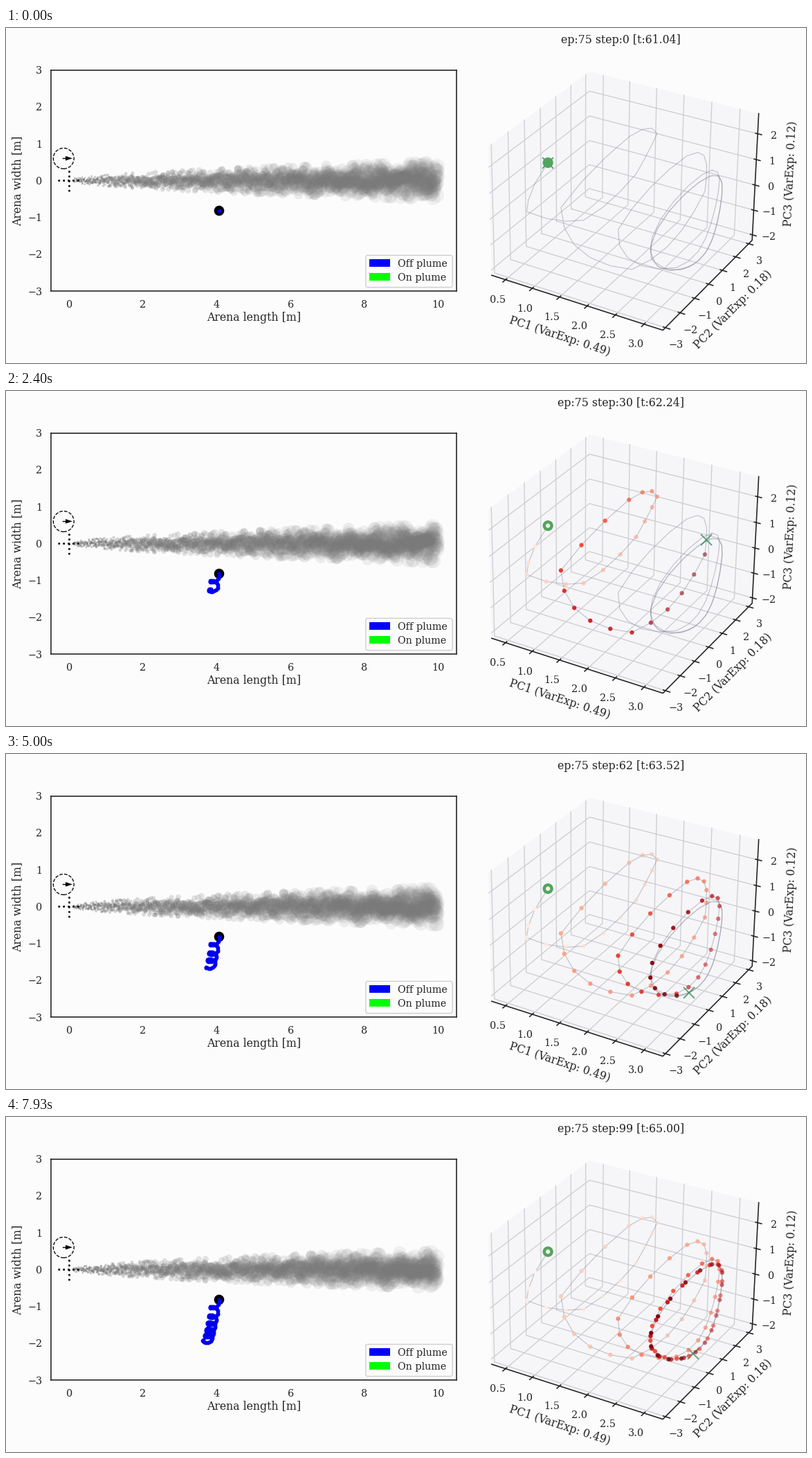
Write a matplotlib script that moves like this. It is 1156 by 484 pixels and loops after 8000 ms.

```python
import numpy as np
import matplotlib.pyplot as plt
from matplotlib.animation import FuncAnimation
from matplotlib.patches import Circle, FancyBboxPatch, Polygon, Rectangle

W, H = 1156, 484
STEPS, INTERVAL = 100, 80
INK, BG = "0.13", "#fcfcfc"
SMALL, LARGE, LINE = 14.4, 15.7, 1.6

plt.rcParams.update({
    "font.family": "DejaVu Serif",
    "text.color": INK,
    "axes.edgecolor": INK,
    "xtick.labelcolor": INK,
    "ytick.labelcolor": INK,
})

# At 72 dpi one point is one pixel.
fig = plt.figure(figsize=(W / 72, H / 72), dpi=72, facecolor=BG)
steps = np.arange(STEPS)


# ---------- arena ----------
arena = fig.add_axes([64.6 / W, 1 - 380.2 / H, 586.5 / W, 319.6 / H], facecolor=BG)
arena.set(xlim=(-0.5, 10.5), ylim=(-3, 3), xticks=range(0, 11, 2), yticks=range(-3, 4))
arena.tick_params(length=0, labelsize=SMALL)
arena.tick_params(axis="x", pad=13)
arena.tick_params(axis="y", pad=12)
for spine in arena.spines.values():
    spine.set_linewidth(LINE)

dotted = dict(color="black", lw=2.6, ls=":", zorder=3)
arena.plot([-0.3, 0.3], [0, 0], **dotted)
arena.plot([0, 0], [-0.3, 0.3], **dotted)

# Wind compass
arena.add_patch(Circle((-0.15, 0.6), 0.28, fill=False, ec="black", lw=1.3, ls="--"))

# Whole-figure layer in pixel units, y pointing down.
px = fig.add_axes([0, 0, 1, 1])
px.set(xlim=(0, W), ylim=(H, 0))
px.axis("off")
px.plot([82, 88], [188.3, 188.3], color="black", lw=1.4)
px.add_patch(Polygon([(86, 185), (96, 188.3), (86, 191.6)], fc="black", lw=0))


def label(x, y, text, size=SMALL, va="center_baseline", ha="center", rot=0):
    return px.text(x, y, text, size=size, va=va, ha=ha, rotation=rot)


label(358.5, 423, "Arena length [m]", LARGE, "baseline")
label(16.5, 220.5, "Arena width [m]", LARGE, "center", rot=90)

# Legend
px.add_patch(FancyBboxPatch((522.5, 331), 120, 41, boxstyle="round,pad=2.6",
                            fc=BG, ec="0.8", lw=1.3))
for y, color, text in ((339.5, "#0000ff", "Off plume"), (360, "#00ff00", "On plume")):
    px.add_patch(Rectangle((525, y - 5.8), 30, 11.2, fc=color, lw=0, zorder=2))
    label(566, y, text, ha="left")


# ---------- plume ----------
WIND, RATE, SPAN = 0.5, 90, 24
rng = np.random.default_rng(75)
count = RATE * SPAN
birth = np.arange(count) / RATE - 20 + rng.uniform(-0.06, 0.06, count)
spread = rng.normal(0, 0.07, count).clip(-0.15, 0.15)
plume = arena.scatter([], [], lw=0, zorder=2)


def draw_plume(t):
    x = WIND * (t - birth)
    live = (x > 0.12) & (x < 9.98)
    x = x[live]
    radius = 0.9 + 0.98 * x
    rgba = np.full((x.size, 4), 0.48)
    rgba[:, 3] = 0.55 / (1 + 0.52 * x)
    plume.set_offsets(np.column_stack([x, spread[live] * np.sqrt(x)]))
    plume.set_sizes((2 * radius) ** 2)
    plume.set_facecolors(rgba)


# ---------- agent path: clockwise loops that drift down ----------
turn = 0.1125 * np.pi * steps
agent_x = 302 - 0.115 * steps + 6.3 * np.cos(turn)
agent_y = 264 + 2.41 * steps ** 0.7 + 4.2 * np.sin(turn)
px.add_patch(Circle((308, 264), 7.3, fc="black", lw=0, zorder=3))
trail, = px.plot([], [], "o", color="#0000ee", ms=5.8, mew=0, zorder=4)


# ---------- 3D box ----------
CORNERS = {
    (0, 0, 0): (703, 357), (1, 0, 0): (949, 437), (1, 1, 0): (1079, 306),
    (0, 1, 0): (841, 240), (0, 0, 1): (696, 171), (0, 1, 1): (845, 63),
    (1, 1, 1): (1087, 124),
}


def fit_camera():
    """Perspective matrix that sends the unit cube to the screen corners."""
    rows, rhs = [], []
    for p, (u, v) in CORNERS.items():
        p = np.array(p, float)
        rows.append([*p, 1, 0, 0, 0, 0, *(-u * p)])
        rows.append([0, 0, 0, 0, *p, 1, *(-v * p)])
        rhs += [u, v]
    m = np.linalg.lstsq(np.array(rows), np.array(rhs), rcond=None)[0]
    return np.append(m, 1).reshape(3, 4)


CAMERA = fit_camera()


def project(*points):
    h = np.column_stack([np.array(points, float), np.ones(len(points))]) @ CAMERA.T
    return h[:, :2] / h[:, 2:]


def line3d(*points, **style):
    px.plot(*project(*points).T, **style)


for pane in (
    [(0, 0, 0), (0, 1, 0), (0, 1, 1), (0, 0, 1)],
    [(0, 1, 0), (1, 1, 0), (1, 1, 1), (0, 1, 1)],
    [(0, 0, 0), (1, 0, 0), (1, 1, 0), (0, 1, 0)],
):
    px.add_patch(Polygon(project(*pane), fc="#f6f6f8", lw=0, zorder=0))

# ticks, limits, grid line, tick mark, label offset, number format
AXES3D = (
    (np.arange(0.5, 3.1, 0.5), (0.238, 3.324),
     lambda t: [(t, 0, 0), (t, 1, 0), (t, 1, 1)],
     lambda t: [(t, -0.025, 0), (t, 0.012, 0)], (-11, 28), "{:.1f}"),
    (np.arange(-3, 4), (-3.17, 3.27),
     lambda t: [(1, t, 0), (0, t, 0), (0, t, 1)],
     lambda t: [(1.025, t, 0), (0.988, t, 0)], (15, 24), "{:.0f}"),
    (np.arange(-2, 3), (-2.22, 2.77),
     lambda t: [(1, 1, t), (0, 1, t), (0, 0, t)],
     lambda t: [(1.022, 1, t), (0.988, 1, t)], (23, 1.5), "{:.0f}"),
)
for ticks, (lo, hi), grid, mark, (dx, dy), fmt in AXES3D:
    for value in ticks:
        t = (value - lo) / (hi - lo)
        line3d(*grid(t), color="#cdcdd2", lw=1.3, zorder=1)
        line3d(*mark(t), color=INK, lw=LINE, zorder=2)
        x, y = project(grid(t)[0])[0]
        label(x + dx, y + dy, fmt.format(value).replace("-", "\u2212"))

line3d((0, 0, 0), (1, 0, 0), (1, 1, 0), (1, 1, 1), color=INK, lw=LINE, zorder=2)
label(800.5, 445, "PC1 (VarExp: 0.49)", LARGE, "center", rot=-18)
label(1051, 407, "PC2 (VarExp: 0.18)", LARGE, "center", rot=45.2)
label(1133.5, 210.5, "PC3 (VarExp: 0.12)", LARGE, "center", rot=87.5)
title = label(888.5, 21.5, "", LARGE, "baseline")


# ---------- state trajectory ----------
def limit_cycle(a):
    """Closed orbit on screen, as x + iy, from two harmonics."""
    x = 990.5 + 33 * np.cos(a) - 39.1 * np.sin(a) + 5.4 * np.cos(2 * a) + 7.2 * np.sin(2 * a)
    y = 285 - 68.6 * np.cos(a) - 6.5 * np.sin(a) - 3.2 * np.cos(2 * a) - 2.9 * np.sin(2 * a)
    return x + 1j * y


def transient(n):
    """Offset from the limit cycle, fading as the state settles."""
    at = [1, 4, 7, 10, 13, 16, 19, 24, 29, 34, 38, 43, 53, 62]
    offset = [-150 - 114j, -201 - 84j, -169 - 56j, -118 - 67j, -93 - 68j,
              -98 - 68j, -138 - 33j, -72, -20 - 35j, -27 - 32j,
              -52 - 8j, -13 - 1j, -8j, 0]
    return np.interp(n, at, offset)


since = steps.clip(1) - 70
orbit = limit_cycle(2 * np.pi * since / np.where(since < 0, 18.7, 18.2)) + transient(steps)
states = np.column_stack([orbit.real, orbit.imag])
for a, b in ((0, 53), (52, 71), (70, STEPS)):
    px.plot(*states[a:b].T, color="#85859a", alpha=0.45, lw=1.2, zorder=3)

reds = plt.get_cmap("Reds")
nearness = 0.77 - 0.23 * np.cos(2 * np.pi * (steps - 11) / 18.3)
px.add_patch(Circle(states[0], 7.6, fc="#52a55e", lw=0, zorder=4))
dots = px.scatter([], [], s=6.3 ** 2, lw=0, zorder=5)
cross, = px.plot([], [], "x", color="#2e8b57", alpha=0.78, ms=16, mew=1.9, zorder=3.5)


def update(n):
    draw_plume(n * 0.04)
    trail.set_data(agent_x[:n + 1], agent_y[:n + 1])
    rgba = reds(steps[1:n] / max(n, 1))
    rgba[:, 3] = nearness[1:n]
    dots.set_offsets(states[1:n])
    dots.set_facecolors(rgba)
    cross.set_data(states[n:n + 1, 0], states[n:n + 1, 1])
    title.set_text(f"ep:75 step:{n} [t:{61.04 + n * 0.04:.2f}]")
    return plume, trail, dots, cross, title


anim = FuncAnimation(fig, update, frames=STEPS, interval=INTERVAL, repeat=True, repeat_delay=0)
plt.show()
```
